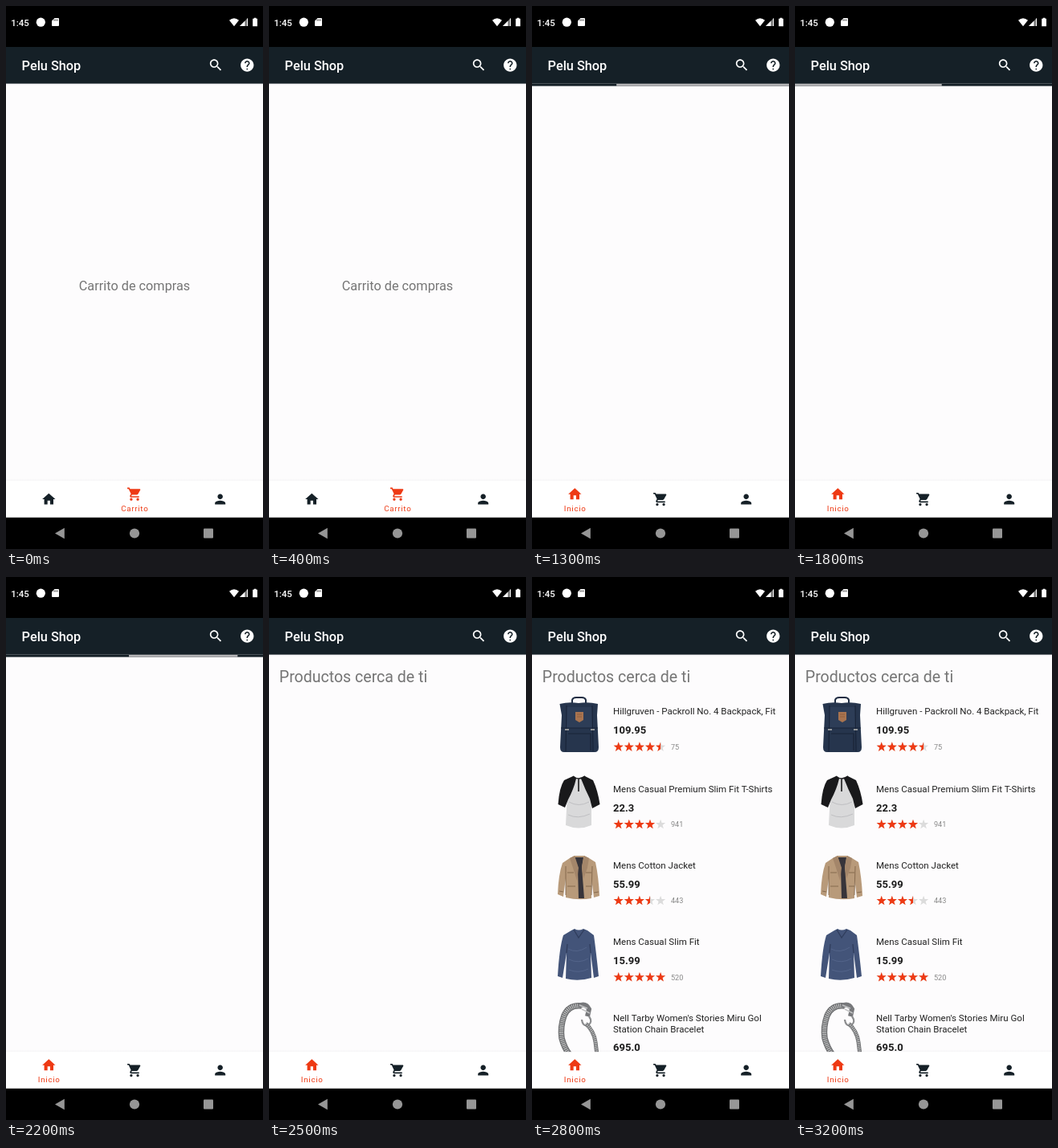
An HTML page with a canvas for the animation above (3500 ms loop, 320 by 676 pixels).

```html
<!DOCTYPE html>
<html lang="es">
<head>
<meta charset="utf-8">
<title>Tienda</title>
<style>
html, body { margin: 0; width: 100%; height: 100%; overflow: hidden; background: #000; }
canvas { display: block; width: 320px; height: 676px; }
</style>
</head>
<body>
<canvas id="stage"></canvas>
<script>
const W = 320, H = 676, LOOP = 3500, STEP = 100;
const DP = 0.8148; // stage pixels per layout unit
const BAR_TOP = 51, BAR_END = BAR_TOP + 56 * DP;
const NAV_TOP = 636.8, TABS_TOP = NAV_TOP - 56 * DP;
const DARK = '#152027', ORANGE = '#ee3a14', PAGE = '#fdfcfd', GREY = '#757575';
const canvas = document.getElementById('stage');
const ctx = canvas.getContext('2d');
const dpr = window.devicePixelRatio || 1;
canvas.width = W * dpr;
canvas.height = H * dpr;

const ICONS = {
  search: 'M15.5 14h-.79l-.28-.27C15.41 12.59 16 11.11 16 9.5 16 5.91 13.09 3 9.5 3S3 5.91 3 9.5 5.91 16 9.5 16c1.61 0 3.09-.59 4.23-1.57l.27.28v.79l5 4.99L20.49 19l-4.99-5zm-6 0C7.01 14 5 11.99 5 9.5S7.01 5 9.5 5 14 7.01 14 9.5 11.99 14 9.5 14z',
  help: 'M12 2C6.48 2 2 6.48 2 12s4.48 10 10 10 10-4.48 10-10S17.52 2 12 2zm1 17h-2v-2h2v2zm2.07-7.75l-.9.92C13.45 12.9 13 13.5 13 15h-2v-.5c0-1.1.45-2.1 1.17-2.83l1.24-1.26c.37-.36.59-.86.59-1.41 0-1.1-.9-2-2-2s-2 .9-2 2H8c0-2.21 1.79-4 4-4s4 1.79 4 4c0 .88-.36 1.68-.93 2.25z',
  home: 'M10 20v-6h4v6h5v-8h3L12 3 2 12h3v8z',
  cart: 'M7 18c-1.1 0-2 .9-2 2s.9 2 2 2 2-.9 2-2-.9-2-2-2zM1 2v2h2l3.6 7.59-1.35 2.45c-.16.28-.25.61-.25.96 0 1.1.9 2 2 2h12v-2H7.42c-.14 0-.25-.11-.25-.25l.03-.12.9-1.63h7.45c.75 0 1.41-.41 1.75-1.03l3.58-6.49c.08-.14.12-.31.12-.48 0-.55-.45-1-1-1H5.21l-.94-2H1zm16 16c-1.1 0-2 .9-2 2s.9 2 2 2 2-.9 2-2-.9-2-2-2z',
  person: 'M12 12c2.21 0 4-1.79 4-4s-1.79-4-4-4-4 1.79-4 4 1.79 4 4 4zm0 2c-2.67 0-8 1.34-8 4v2h16v-2c0-2.66-5.33-4-8-4z'
};

function rect(color, x, y, w, h) {
  ctx.fillStyle = color;
  ctx.fillRect(x, y, w, h);
}

function fill(color, d) {
  ctx.fillStyle = color;
  ctx.fill(new Path2D(d));
}

function line(color, width, d) {
  ctx.strokeStyle = color;
  ctx.lineWidth = width;
  ctx.stroke(new Path2D(d));
}

function disc(color, x, y, r) {
  ctx.fillStyle = color;
  ctx.beginPath();
  ctx.arc(x, y, r, 0, 7);
  ctx.fill();
}

function icon(name, x, y, color) {
  ctx.save();
  ctx.translate(x, y);
  ctx.scale(DP, DP);
  ctx.translate(-12, -12);
  fill(color, ICONS[name]);
  ctx.restore();
}

// Size is given in layout units
function text(str, x, y, size, color, { weight = 400, align = 'left', spacing = 0 } = {}) {
  ctx.font = `${weight} ${size * DP}px Roboto, sans-serif`;
  ctx.letterSpacing = spacing + 'px';
  ctx.textAlign = align;
  ctx.fillStyle = color;
  ctx.fillText(str, x, y);
}

// Vertical fade used for the soft shadows of the two bars
function fade(y, h, from, to) {
  const g = ctx.createLinearGradient(0, y, 0, y + h);
  g.addColorStop(0, `rgba(40,40,70,${from})`);
  g.addColorStop(1, `rgba(40,40,70,${to})`);
  rect(g, 0, y, W, h);
}

function topBars() {
  rect('#000', 0, 0, W, BAR_TOP);
  rect(DARK, 0, BAR_TOP, W, BAR_END - BAR_TOP);
  text('1:45', 6.3, 24.6, 14, '#fff', { weight: 500 });
  disc('#fff', 43.3, 20.2, 5.6);
  fill('#fff', 'M60.5 15H65q1 0 1 1v8q0 1-1 1h-7q-1 0-1-1v-5.5z');
  [60, 62, 64].forEach(x => rect('#000', x - 0.4, 16.5, 0.8, 2));
  fill('#fff', 'M278 17.8Q284 12.6 290 17.8L284 25.2z');
  fill('rgba(255,255,255,.45)', 'M301 15V25H291z');
  fill('#fff', 'M297.5 18.5V25H291zM300 16L301 15V25H300z');
  fill('#fff', 'M308.7 14.8h2.8v1h1.5v9.4h-5.8v-9.4h1.5z');
  text('Pelu Shop', 19.6, 80.2, 20, '#fff', { weight: 500 });
  icon('search', 261.2, 73.6, '#fff');
  icon('help', 300.3, 73.6, '#fff');
}

function bottomBars({ atHome, pressed, homeOn }) {
  fade(TABS_TOP - 3, 3, 0, 0.03);
  rect('#fff', 0, TABS_TOP, W, NAV_TOP - TABS_TOP);
  const label = { align: 'center', spacing: 0.7 };
  icon('home', 53.3, atHome ? 607.7 : 614.1, homeOn ? ORANGE : DARK);
  icon('cart', 160, atHome ? 614.1 : 607.7, homeOn ? DARK : ORANGE);
  icon('person', 266.7, 614.1, DARK);
  if (atHome) text('Inicio', 53.7, 628.8, 12, ORANGE, label);
  else text('Carrito', 160.3, 628.8, 12, homeOn ? DARK : ORANGE, label);
  if (pressed) {
    disc('rgba(255,255,255,.55)', 54, 619.5, 9.3);
    ctx.strokeStyle = 'rgba(110,110,110,.35)';
    ctx.lineWidth = 1;
    ctx.stroke();
  }
  rect('#000', 0, NAV_TOP, W, H - NAV_TOP);
  fill('#969696', 'M61 656.5L72.8 649.8V663.2z');
  disc('#969696', 160, 656.5, 6.1);
  ctx.beginPath();
  ctx.roundRect(246, 650.5, 12, 12, 1);
  ctx.fill();
}

// Solves a unit cubic Bezier easing whose y handles are 0 and 1
function ease(x, x1, x2) {
  x = Math.max(0, Math.min(1, x));
  let lo = 0, hi = 1;
  for (let i = 0; i < 24; i++) {
    const s = (lo + hi) / 2, r = 1 - s;
    if (3 * x1 * s * r * r + 3 * x2 * s * s * r + s ** 3 < x) lo = s;
    else hi = s;
  }
  return lo * lo * (3 - 2 * lo);
}

// Two segments chase each other; the bar stalls from 2000 ms while the list loads
function progress(time) {
  const t = 761 + (Math.min(time, 2000) - 1300) * 0.964;
  const head1 = ease(t / 750, 0.2, 0.8);
  const tail1 = ease((t - 333) / 850, 0.4, 1);
  const head2 = ease((t - 1000) / 567, 0, 0.65);
  const tail2 = ease((t - 1267) / 533, 0.1, 0.45);
  rect(DARK, 0, BAR_END, W, 3);
  rect('#b4b4b6', tail1 * W, BAR_END, (head1 - tail1) * W, 3);
  rect('#b4b4b6', tail2 * W, BAR_END, (head2 - tail2) * W, 3);
}

function backpack() {
  line('#202d43', 2, 'M50 158V153Q51 150 55 150H62Q66 150 67 153V158');
  fill('#26354d', 'M34.500 158Q46 155 58 157Q70 155 82 158L81 172L83 212Q83 218 78 218H40Q35 218 35 212L37 172z');
  fill('#2d3d57', 'M42 162H75L77 188H41z');
  line('#192438', 1.2, 'M36 188H82M43 160L42 217M75 160L76 217M45 195H73V216');
  fill('#a87450', 'M54 168H64V178L59 181L54 178z');
  line('#8b5a39', 0.8, 'M56 171H62M56 174H62');
  line('#b9b8b2', 1.5, 'M41 190H46M73 190H78');
}

function raglan() {
  fill('#d9d9da', 'M50 249Q57 254 65 249L71 256L74 270V309Q58 316 42 309L44 270L45 256z');
  line('#bfbfc2', 1, 'M46 280Q58 287 71 280M45 296Q57 302 72 295');
  fill('#19191b', 'M51 248L40 253Q34 262 32.500 283L41 287L45 277Q52 264 55 251zM66 248L76 253Q82 266 84.500 283L75 288L72 276Q66 264 61 251z');
  line('#19191b', 1.6, 'M51 248Q58 254 66 248M58 251V267');
}

function jacket() {
  fill('#b89a7a', 'M47 350L53 347H65L71 350L79 355Q83 374 84 397L77 399L74 375V400Q58 403 42 399V375L39 398L32 395Q33 370 38 356z');
  fill('#37343a', 'M53 349H64L62 361L65 400H58L57 363z');
  fill('#a4866a', 'M47 350L53 347L58 362L56 378L51 362zM71 350L65 347L62 361L64 376L69 362z');
  line('#806549', 0.9, 'M42 360V396M75 360L74 396M44 368H52M67 368H74M44 385H54M67 385H74M34 391L39 392M77 393L83 392');
}

function sweater() {
  fill('#435479', 'M49 440L53 438Q58 441 64 438L69 440L77 446Q80 468 83 497L77 499L73 468L74 499Q58 504 42 500L43 468L38 499L32 497Q34 462 39 446z');
  line('#303d5c', 1.3, 'M52 439L58 449L65 439M43 468L44 457M73 468L72 457');
  line('#53648a', 1, 'M46 476Q58 482 70 475M46 489Q58 494 70 488M45 463Q56 469 68 461');
}

// A braided strand: dark core with pale dashes across it
function strand(width, d) {
  line('#6d6e70', width, d);
  ctx.setLineDash([1, 1.3]);
  line('#c9caca', width * 0.7, d);
  ctx.setLineDash([]);
}

function bracelet() {
  strand(7.5, 'M62 534Q46 532 40 546Q35 560 37 574Q40 586 47 595');
  line('#77787b', 6, 'M58 534Q67 530 71 538L69 547');
  line('#c2c3c4', 1.5, 'M59 533L69 537M62 538L72 543');
  line('#8c8d8f', 2.2, 'M62 551Q63 560 70 558Q76 554 71 547');
  strand(5, 'M67 556Q77 565 79 579L81 595');
}

function starPath(x, y) {
  ctx.beginPath();
  for (let i = 0; i < 10; i++) {
    const a = i * Math.PI / 5 - Math.PI / 2, r = i % 2 ? 2.6 : 6.4;
    ctx.lineTo(x + r * Math.cos(a), y + r * Math.sin(a));
  }
  ctx.closePath();
}

function stars(score, y) {
  for (let i = 0; i < 5; i++) {
    const x = 107.7 + i * 13.1;
    ctx.save();
    starPath(x, y);
    ctx.clip();
    rect('#dcdcdc', x - 7, y - 7, 14, 14);
    rect(ORANGE, x - 7, y - 7, 14 * Math.max(0, Math.min(1, score - i)), 14);
    ctx.restore();
  }
}

const PRODUCTS = [
  { y: 171.3, lines: ['Hillgruven - Packroll No. 4 Backpack, Fit'], price: '109.95', score: 4.5, votes: 75, draw: backpack },
  { y: 267.7, lines: ['Mens Casual Premium Slim Fit T-Shirts'], price: '22.3', score: 4, votes: 941, draw: raglan },
  { y: 362.7, lines: ['Mens Cotton Jacket'], price: '55.99', score: 3.5, votes: 443, draw: jacket },
  { y: 457.9, lines: ['Mens Casual Slim Fit'], price: '15.99', score: 5, votes: 520, draw: sweater },
  { y: 553.2, lines: ["Nell Tarby Women's Stories Miru Gol", 'Station Chain Bracelet'], price: '695.0', score: 4.5, votes: 400, draw: bracelet }
];

function productList() {
  for (const p of PRODUCTS) {
    const shift = (p.lines.length - 1) * 13.4;
    p.draw();
    p.lines.forEach((s, i) => text(s, 101, p.y + i * 13.4, 14.15, '#222'));
    text(p.price, 101, p.y + 23.8 + shift, 16, '#1c1c1c', { weight: 700 });
    stars(p.score, p.y + 40.4 + shift);
    text(p.votes, 173, p.y + 43.6 + shift, 11.2, '#888');
  }
}

function draw(time) {
  ctx.setTransform(dpr, 0, 0, dpr, 0, 0);
  rect(PAGE, 0, BAR_TOP, W, NAV_TOP - BAR_TOP);
  fade(BAR_END, 2.5, 0.07, 0);
  const atHome = time >= 1200;
  if (!atHome) text('Carrito de compras', 160, 354, 20, GREY, { align: 'center' });
  else if (time < 2500) progress(time);
  else text('Productos cerca de ti', 12.8, 130.6, 24, GREY);
  if (time >= 2600) productList();
  topBars();
  bottomBars({ atHome, homeOn: time >= 1100, pressed: time >= 900 && time < 1200 });
}

function frame() {
  const time = performance.now() % LOOP;
  draw(Math.floor(time / STEP) * STEP);
  requestAnimationFrame(frame);
}
frame();
</script>
</body>
</html>
```
